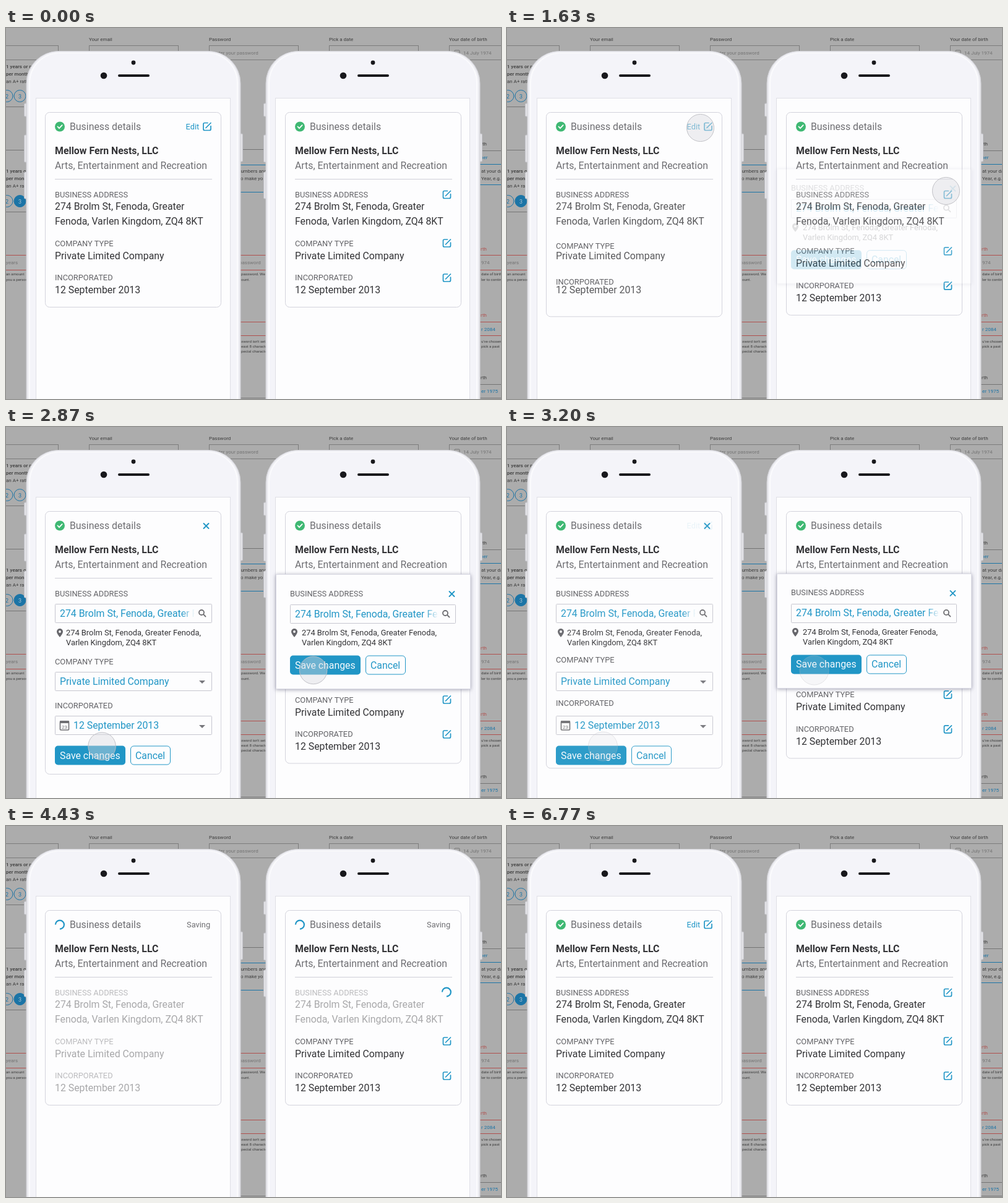
Animation of 800 by 600 pixels, one loop 6810 ms. Source, as an HTML page:

```html
<!DOCTYPE html>
<html lang="en">
<meta charset="utf-8">
<title>Inline editing</title>
<style>
html, body { margin: 0; width: 100%; height: 100%; overflow: hidden; background: #acacac }
svg { display: block; font-family: Roboto, Arial, sans-serif }
.popup { filter: drop-shadow(0 1px 3px #66668099) }
</style>
<svg id="stage" width="800" height="600" viewBox="0 0 800 600"></svg>
<script>
const LOOP = 6810;
const BODY = 15.85, SMALL = 12.85;
const INK = '#333336', SOFT = '#6e6e72', LABEL = '#636367', BLUE = '#2196c6';
const EDGE = '#d3d3dc', PAPER = '#fdfdfe', RED = '#b0504e', DEEP = '#1b74a6';
const NAME = 'Mellow Fern Nests, LLC';
const STREET = '274 Brolm St, Fenoda, Greater';
const REST = 'Fenoda, Varlen Kingdom, ZQ4 8KT';

const text = (x, y, s, size = BODY, fill = INK, more = '') =>
  `<text x="${x}" y="${y}" font-size="${size}" fill="${fill}" ${more}>${s}</text>`;
const rect = (x, y, w, h, r, fill, stroke = 'none', more = '') =>
  `<rect x="${x}" y="${y}" width="${w}" height="${h}" rx="${r}" fill="${fill}" stroke="${stroke}" ${more}/>`;
const circle = (x, y, r, fill, stroke = 'none', more = '') =>
  `<circle cx="${x}" cy="${y}" r="${r}" fill="${fill}" stroke="${stroke}" ${more}/>`;
const line = (x1, x2, y, c, w = 1) => `<path d="M${x1} ${y}H${x2}" stroke="${c}" stroke-width="${w}"/>`;
const icon = (x, y, d, c = BLUE, w = 1.7) =>
  `<path transform="translate(${x} ${y})" d="${d}" fill="none" stroke="${c}" stroke-width="${w}" stroke-linecap="round"/>`;
const group = (id, ...parts) => `<g id="${id}">${parts.join('')}</g>`;
const label = (x, y, s) => text(x, y, s, SMALL, LABEL);

const pencil = (x, y) => icon(x, y, 'M1-6H-4Q-6-6-6-4V4Q-6 6-4 6H4Q6 6 6 4V-1M-2 2L6-6');
const cross = (x, y) => icon(x, y, 'M-4-4L4 4M4-4L-4 4', BLUE, 1.9);
const check = () => circle(87, 159.5, 8, '#3fb873') + icon(87, 159.5, 'M-3.5 0L-1 2.7L3.7-2.4', '#fff', 1.8);
const spinner = (x, y) =>
  `<g transform="translate(${x} ${y})"><path class="spin" d="M-5-5A7 7 0 1 1-5 5" fill="none" stroke="${BLUE}" stroke-width="2.2"/></g>`;
const caret = y => `<path d="M312 ${y}h10l-5 5z" fill="#77777c"/>`;
const field = (x, y, w) => rect(x + .5, y + .5, w - 1, 30, 1, PAPER, '#c6c6cf');

// ---------- backdrop ----------
function backdrop() {
  const ink = '#3c3c3c', dim = '#747474';
  const small = (x, y, s, c = ink, size = 8, more) => text(x, y, s, size, c, more);
  const bold = 'font-weight="500"';
  let s = rect(0, 0, 800, 600, 0, '#acacac');
  ['Your email', 'Password', 'Pick a date', 'Your date of birth'].forEach((t, i) => s += small(134 + 194 * i, 20.5, t));
  for (let i = -1; i < 4; i++) s += rect(134.5 + 194 * i, 28.5, 144, 23, 0, 'none', '#7c7c7c');
  s += small(335, 43, 'Enter your password', dim) + small(739, 43, '14 July 1974', dim)
    + rect(725, 36, 8, 8, 1, 'none', dim);

  for (const y of [65, 234]) s += small(0, y, '1 years or more', ink, 8, bold)
    + small(0, y + 12, 'per month', ink, 8, bold) + small(0, y + 24, 'an A+ rating');
  for (const [y, fill] of [[110, 'none'], [280, DEEP]]) {
    s += circle(1.5, y, 9.5, 'none', DEEP) + circle(22.5, y, 9.5, fill, DEEP);
    s += small(-1, y + 3.5, '2', DEEP, 9) + small(20, y + 3.5, '3', fill === 'none' ? DEEP : '#acc4d2', 9);
  }
  s += line(0, 40, 127.5, dim) + line(0, 40, 197.5, dim) + line(0, 40, 297.5, dim);
  s += small(0, 381.5, 'years', dim) + small(0, 400, 'an amount', ink, 6.2) + small(0, 408.5, 'you a person', ink, 6.2);

  s += line(370, 430, 196.5, dim) + line(370, 430, 221.5, DEEP) + line(370, 430, 265.5, DEEP);
  s += small(375, 234, 'numbers and') + small(379, 246, 'o make your');
  s += small(377, 381.5, 'password', dim) + small(380, 400, 'password. We', ink, 6.2) + small(380, 408.5, 'ount.', ink, 6.2);
  ['sword isn\'t set', 'east 8 characters', 'pecial character'].forEach((t, i) => s += small(380, 509 + 8 * i, t, ink, 6.2));

  s += small(767, 189.5, 'rth') + small(767, 212, 'ber', DEEP) + small(768, 234, 'at your date') + small(768, 246, 'Year, e.g.');
  s += line(760, 800, 198.5, dim) + line(760, 800, 220.5, DEEP) + line(760, 800, 253.5, DEEP);
  s += small(767, 359.5, 'rth', RED) + small(768, 381.5, '974', dim)
    + small(768, 400, 'date of birth', ink, 6.2) + small(768, 408.5, 'ler to continue', ink, 6.2);
  s += small(767, 467, 'rth', RED) + small(768, 489.5, 'r 2084', DEEP)
    + small(768, 509, 'u\'ve chosen', ink, 6.2) + small(768, 517, 'pick a past', ink, 6.2);
  s += small(767, 567.5, 'rth') + small(768, 589.5, 'er 1975', DEEP) + line(760, 800, 576.5, dim) + line(370, 800, 598.5, dim);
  for (const [a, b] of [[0, 40], [370, 430], [760, 800]]) {
    s += line(a, b, 367.5, RED) + line(a, b, 391.5, RED);
    if (a) s += line(a, b, 475.5, RED) + line(a, b, 497.5, RED);
  }
  return s;
}

function phone(dx) {
  const button = (x, y, h) => rect(x, y, 5, h, 1.5, '#e2e2e6', '#c2c2c8');
  return `<g transform="translate(${dx})">`
    + button(29.5, 122, 21) + button(29.5, 173, 44) + button(29.5, 233, 43) + button(377.5, 171, 45)
    + rect(33, 37.5, 346, 700, 52, '#e5e5ea', '#d2d2d7')
    + rect(36, 39, 340, 700, 50, '#fbfbfd', '#f0f0f5', 'stroke-width="2"')
    + rect(39, 41, 334, 700, 48, '#f4f4f9')
    + rect(48.5, 113.5, 314, 500, 0, PAPER, '#dfdfe6')
    + circle(158, 77, 5.3, '#18181c') + circle(206, 56, 3.4, '#18181c')
    + `<path d="M183 77H230" stroke="#18181c" stroke-width="4" stroke-linecap="round"/></g>`;
}

// ---------- shared card parts ----------
const heading = side =>
  group(side + 'Check', check()) + group(side + 'Busy', spinner(87, 159.5), text(292, 164, 'Saving', SMALL, SOFT))
  + text(103, 165, 'Business details', BODY, SOFT)
  + text(79, 204, NAME, BODY, INK, 'font-weight="700"')
  + text(79, 228, 'Arts, Entertainment and Recreation', BODY, SOFT)
  + line(79, 333, 244.5, '#cfcfd8');
const address = () => text(79, 294, STREET) + text(79, 318, REST);

function search(x, y, w) {
  const room = w - 36;
  return field(x, y, w)
    + `<svg x="${x + 8}" y="${y + 2}" width="${room}" height="27">${text(0, 18.5, STREET + ' Fenoda', BODY, BLUE)}`
    + rect(room - 22, 0, 22, 27, 0, 'url(#fadeOut)') + '</svg>'
    + icon(x + w - 16, y + 15, 'M2.2 2.2L5.5 5.5M3-1A4 4 0 1 1-5-1A4 4 0 1 1 3-1', SOFT, 1.8);
}
const hint = (pin, x) =>
  `<path d="M${pin} 340Q${pin - 5} 334 ${pin - 5} 331a5 5 0 0 1 10 0Q${pin + 5} 334 ${pin} 340z" fill="#66666b"/>`
  + circle(pin, 331, 1.9, PAPER)
  + text(x, 337, STREET + ' Fenoda,', SMALL) + text(x, 353, 'Varlen Kingdom, ZQ4 8KT', SMALL);
const buttons = (x, y) => rect(x, y, 114, 31, 5, BLUE) + text(x + 8, y + 21, 'Save changes', BODY, '#f6fbfe')
  + rect(x + 122.5, y + .5, 64, 30, 5, PAPER, BLUE) + text(x + 130, y + 21, 'Cancel', BODY, BLUE);
const calendar = rect(87.5, 476, 14, 14, 1, PAPER, SOFT, 'stroke-width="1.6"')
  + rect(87, 475, 15, 4, 1, SOFT) + text(90, 488, '23', 8, SOFT);

const defs = `<linearGradient id="fadeOut"><stop stop-color="${PAPER}" stop-opacity="0"/><stop offset="1" stop-color="${PAPER}"/></linearGradient>`
  + '<clipPath id="inside"><rect id="insideBox" x="63" y="136" width="286" height="315"/></clipPath>';

const left = rect(63.5, 136.5, 284, 315, 7, PAPER, EDGE, 'id="leftCard"')
  + heading('left')
  + group('leftEdit', text(290.5, 164, 'Edit', SMALL, BLUE), pencil(325, 159.5))
  + group('leftClose', cross(323.5, 160))
  + group('leftRows',
    label(79, 273.5, 'BUSINESS ADDRESS'),
    group('typeLabel', label(79, 352.5, 'COMPANY TYPE')),
    group('dateLabel', label(79, 408, 'INCORPORATED')),
    group('leftValues', address(), text(79, 373.5, 'Private Limited Company'), text(79, 429, '12 September 2013')))
  + '<g clip-path="url(#inside)">' + group('leftForm',
    search(79, 286, 254), hint(87, 97),
    field(79, 396, 254), text(87, 417, 'Private Limited Company', BODY, BLUE), caret(410),
    field(79, 467, 254), calendar, text(109, 488, '12 September 2013', BODY, BLUE), caret(482),
    buttons(79, 515.5)) + '</g>';

const right = rect(63.5, 136.5, 284, 315, 7, PAPER, EDGE, 'id="rightCard"')
  + heading('right')
  + group('rightAddress', label(79, 273.5, 'BUSINESS ADDRESS'), address())
  + group('rightPencil', pencil(324.5, 269.5)) + group('rightSpin', spinner(324, 268.5))
  + group('rightRows',
    label(79, 352.5, 'COMPANY TYPE'), text(79, 373.5, 'Private Limited Company'), pencil(324.5, 348),
    label(79, 408, 'INCORPORATED'), text(79, 429, '12 September 2013'), pencil(324.5, 404))
  + group('popup',
    rect(48.5, 238.5, 314, 185, 0, PAPER, '#dcdce6', 'class="popup"'),
    label(71, 273.5, 'BUSINESS ADDRESS'), cross(332.5, 270),
    search(71, 287, 268), hint(78, 90), buttons(71, 369.5));

const touch = id => group(id, circle(0, 0, 23.5, '#d9d9dd', '#bebec4', 'fill-opacity=".42"'));

const stage = document.getElementById('stage');
stage.innerHTML = defs + backdrop() + phone(0) + phone(387) + left
  + `<g transform="translate(388)">${right}</g>` + touch('touchL') + touch('touchR');

// ---------- motion ----------
const el = {};
stage.querySelectorAll('[id]').forEach(n => el[n.id] = n);
const spins = stage.querySelectorAll('.spin');
const ease = (t, a, b) => {
  const u = Math.min(1, Math.max(0, (t - a) / (b - a)));
  return u * u * (3 - 2 * u);
};
const fade = (id, v) => el[id].setAttribute('opacity', v);
const shift = (id, y) => el[id].setAttribute('transform', `translate(0 ${y})`);
const bend = (a, m, b, u) => (1 - u) * (1 - u) * a + 2 * u * (1 - u) * m + u * u * b;

function moveTouch(id, t, [ax, ay, mx, my, bx, by]) {
  const u = ease(t, 2250, 2880);
  const x = bend(ax, mx, bx, u), y = bend(ay, my, by, u) + 40 * (1 - ease(t, 1180, 1480));
  const press = (a, b, c) => ease(t, a, b) - ease(t, b, c);
  const size = 1 - .15 * (press(1480, 1570, 1680) + press(2800, 2980, 3120));
  el[id].setAttribute('transform', `translate(${x} ${y}) scale(${size})`);
  fade(id, ease(t, 1180, 1380) - ease(t, 3100, 3280));
}

function draw(t) {
  const open = ease(t, 1570, 1830) - ease(t, 3150, 3430);
  const busy = ease(t, 3270, 3490) - ease(t, 5700, 5920);
  const idle = 1 - busy, muted = 1 - .58 * busy;

  el.leftCard.setAttribute('height', 315 + 110 * open);
  el.insideBox.setAttribute('height', 315 + 110 * open);
  el.rightCard.setAttribute('height', 315 + 92.5 * open);
  shift('typeLabel', 31.5 * open);
  shift('dateLabel', 47 * open);
  shift('rightRows', 93 * open);
  shift('popup', -12 * (1 - open));

  fade('leftEdit', (1 - open) * idle);
  fade('leftClose', open);
  fade('leftValues', 1 - ease(open, 0, .5));
  fade('leftForm', ease(open, .4, 1));
  fade('popup', ease(open, 0, .5));
  fade('leftRows', muted);
  fade('rightAddress', muted);
  fade('rightPencil', idle);
  fade('rightSpin', busy);
  for (const side of ['left', 'right']) {
    fade(side + 'Check', idle);
    fade(side + 'Busy', busy);
  }
  spins.forEach(s => s.setAttribute('transform', `rotate(${(t - 3530) * .35})`));

  moveTouch('touchL', t, [312.5, 161.5, 200, 320, 155, 516.5]);
  moveTouch('touchR', t, [709.5, 263.5, 600, 310, 496.5, 393.5]);
}

const start = performance.now();
function tick() {
  draw((performance.now() - start) % LOOP);
  requestAnimationFrame(tick);
}
tick();
</script>
</html>
```
